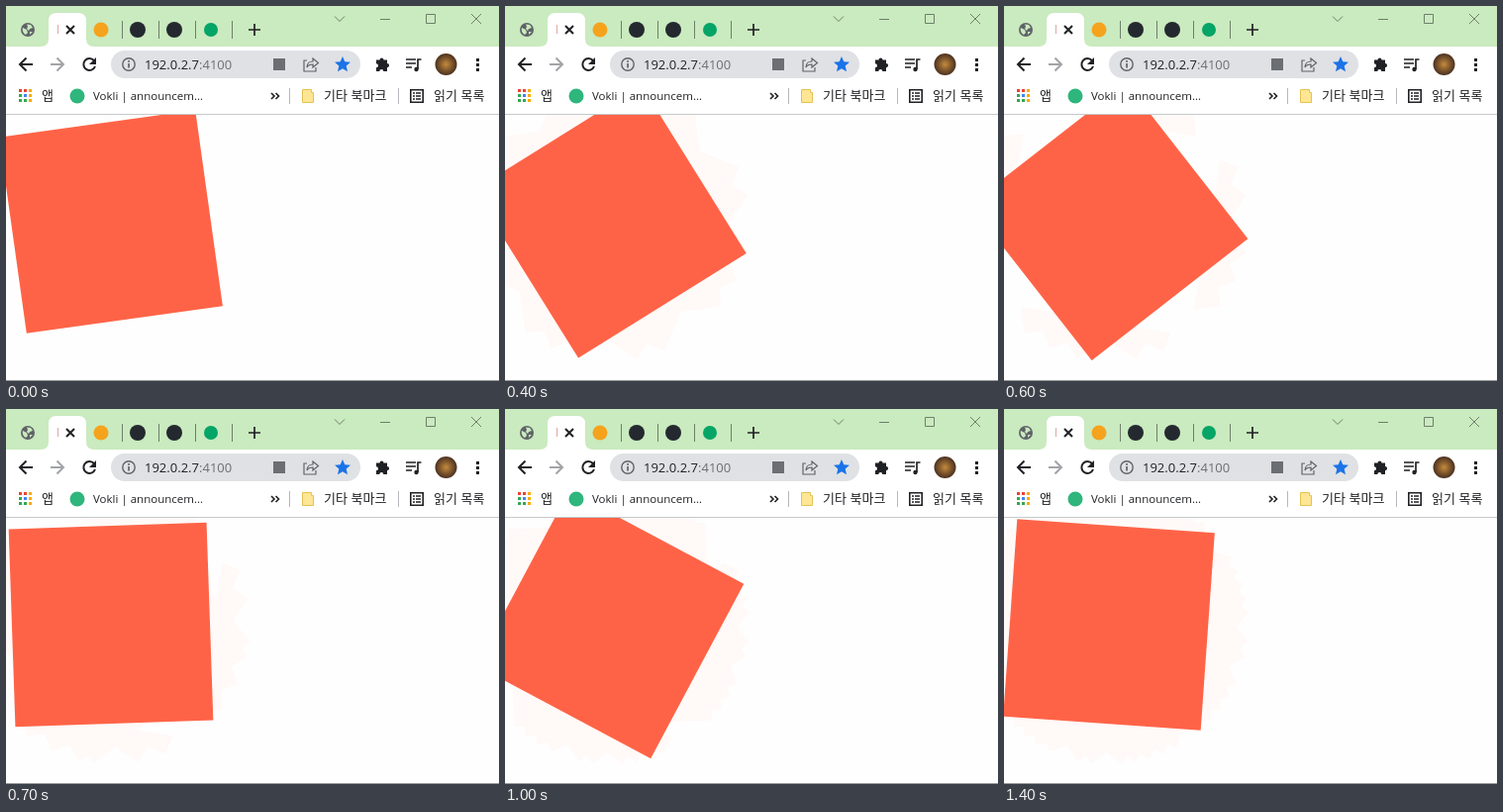
An HTML page for the animation above (1.5 s loop, 498 px wide and 379 px high).

```html
<!DOCTYPE html>
<html lang="ko">
<head>
<meta charset="utf-8">
<title>Spinning square</title>
<style>
  html, body { margin: 0; width: 100%; height: 100%; overflow: hidden; background: #fefefe; }
  svg { display: block; }
  text { font: 11.5px "Open Sans", sans-serif; fill: #202124; white-space: pre; }
  .url { font-size: 13px; }
  .ko { font: 13px "Noto Sans CJK KR", "Noto Sans CJK", sans-serif; }
  .line { fill: none; stroke: #202124; stroke-width: 2; }
  .thin { fill: none; stroke: #6d7f6a; stroke-width: 1; }
  .gray { stroke: #5f6368; stroke-width: 1.4; }
</style>
</head>
<body>
<svg width="498" height="379" viewBox="0 0 498 379">
  <defs>
    <radialGradient id="avatar">
      <stop offset="0" stop-color="#c58a3c"/>
      <stop offset="1" stop-color="#4a3020"/>
    </radialGradient>
  </defs>

  <g id="squares" transform="translate(106 218)"></g>

  <!-- Tab strip -->
  <path fill="#caeabf" d="M0 0H498V41H0Z"/>
  <path fill="#fff" d="M0 41H498V109H0ZM35 41q8 0 8-8V15q0-8 8-8h22q8 0 8 8v18q0 8 8 8Z"/>
  <circle cx="22" cy="24" r="7" fill="#5f6368"/>
  <path fill="#caeabf" d="M17 22l4 2 1 3-2 2c-2-1-4-4-3-7zM21 18.500l4 .5 2 3-3 1-1 2-2-2 1-2zM24 26l3 0-3 3z"/>
  <path fill="#e2a5a5" d="M52 19h1v9h-1z"/>
  <path class="line" stroke-width="1.800" d="M61 20l8 8M69 20l-8 8"/>
  <circle cx="96" cy="24" r="7.500" fill="#f5a31d"/>
  <circle cx="133" cy="24" r="8" fill="#24292f"/>
  <circle cx="170" cy="24" r="8" fill="#24292f"/>
  <circle cx="207" cy="24" r="7" fill="#04a566"/>
  <path class="thin" d="M117.500 15v18M154.500 15v18M191.500 15v18M228.500 15v18"/>
  <path class="line" style="stroke-width:1.700" d="M245 24h12M251 18v12"/>
  <path class="thin" d="M332 10.500l5 5 5-5M378 13.500h10M424.500 8.500h9v9h-9zM470 8l10 10M480 8l-10 10"/>

  <!-- Address bar -->
  <path class="line" d="M27 59H14M20.500 52.500L14 59l6.500 6.500"/>
  <path class="line" style="stroke:#a2a4a7" d="M45 59h13M51.500 52.500L58 59l-6.500 6.500"/>
  <path class="line" d="M89 55.200A6 6 0 1 0 90 61"/>
  <path fill="#202124" d="M91 52v7h-7z"/>
  <rect x="106" y="45" width="252" height="28" rx="14" fill="#dfe1e5"/>
  <circle class="line gray" cx="124" cy="59" r="6.200"/>
  <path fill="#5f6368" d="M123.200 55h1.700v1.700h-1.700zM123.200 58h1.700v4.500h-1.700z"/>
  <text class="url" x="140" y="64">192.0.2.7<tspan fill="#6b6f74">:4100</tspan></text>
  <rect x="270" y="53" width="12" height="12" fill="#6b6f74"/>
  <path class="line gray" style="stroke-width:1.200" d="M304 55h-3v11h12v-4M304 62c0-4 3-6 6-6v-3l5.500 4.500-5.500 4.500v-3c-3 0-5 1-6 3z"/>
  <path fill="#1a73e8" d="M340 51l2.300 5.300 5.700.5-4.300 3.800 1.300 5.700-5-3-5 3 1.300-5.700-4.300-3.800 5.700-.5z"/>
  <path fill="#202124" d="M374 54.500h3.500a2 2 0 0 1 4 0H385V58a2 2 0 0 1 0 4.200V66h-3.700a2 2 0 0 0-4 0H374v-3.700a2 2 0 0 0 0-4z"/>
  <path class="line" style="stroke-width:1.700" d="M404 54h10M404 58h10M404 62h6M416 64v-10h3.500"/>
  <circle cx="414.500" cy="64" r="2.200" fill="#202124"/>
  <circle cx="444.500" cy="59" r="11" fill="url(#avatar)"/>
  <path fill="#202124" d="M475 53h3v3h-3zM475 58h3v3h-3zM475 63h3v3h-3z"/>

  <!-- Bookmarks -->
  <g id="apps"></g>
  <text class="ko" x="36" y="95">앱</text>
  <circle cx="72" cy="91" r="7.500" fill="#2eb67d"/>
  <text x="88" y="95">Vokli | announcem…</text>
  <path class="line" style="stroke-width:1.600" d="M268 88l3 3-3 3M272.500 88l3 3-3 3"/>
  <path fill="none" stroke="#b5b8bc" d="M286.500 83v16M396.500 83v16"/>
  <path fill="#ffe694" stroke="#e5c253" d="M299.500 84.500h9v3h2v10h-11z"/>
  <text class="ko" x="321" y="95">기타 북마크</text>
  <path class="line" style="stroke-width:1.600" d="M408.800 84.800h12.400v12.400h-12.400zM411 88h2M414 88h5M411 91h2M414 91h5M411 94h2M414 94h5"/>
  <text class="ko" x="432" y="95">읽기 목록</text>

  <path fill="#c6c8ca" d="M0 109H498v1H0z"/>
  <path fill="#a0a0a0" d="M0 378H498v1H0z"/>
</svg>
<script>
  const STEPS = 15, STEP_MS = 100, CLEARED = 5;

  function addRect(parent, attrs) {
    const rect = document.createElementNS("http://www.w3.org/2000/svg", "rect");
    for (const name in attrs) rect.setAttribute(name, attrs[name]);
    return document.getElementById(parent).appendChild(rect);
  }

  ["#ea4335", "#ea4335", "#f9ab00", "#34a853", "#4285f4", "#f9ab00", "#34a853", "#34a853", "#f9ab00"]
    .forEach((fill, i) => addRect("apps", {
      x: 13 + i % 3 * 5, y: 84 + Math.floor(i / 3) * 5, width: 3, height: 3, fill
    }));

  // One turn per second, sampled every 110 ms on a 60 Hz grid (6 degrees per tick).
  const squares = Array.from({ length: STEPS }, (_, i) => addRect("squares", {
    x: -100, y: -100, width: 200, height: 200,
    transform: `rotate(${6 * Math.round(6.6 * i) - 7.95})`
  }));

  function draw() {
    const step = Math.floor(performance.now() / STEP_MS) % STEPS;
    squares.forEach((square, i) => {
      square.style.display = i > step ? "none" : "";
      square.style.fill = i === step ? "#ff6347" : i === CLEARED ? "#fefefe" : "#fff9f7";
    });
    requestAnimationFrame(draw);
  }
  draw();
</script>
</body>
</html>
```
